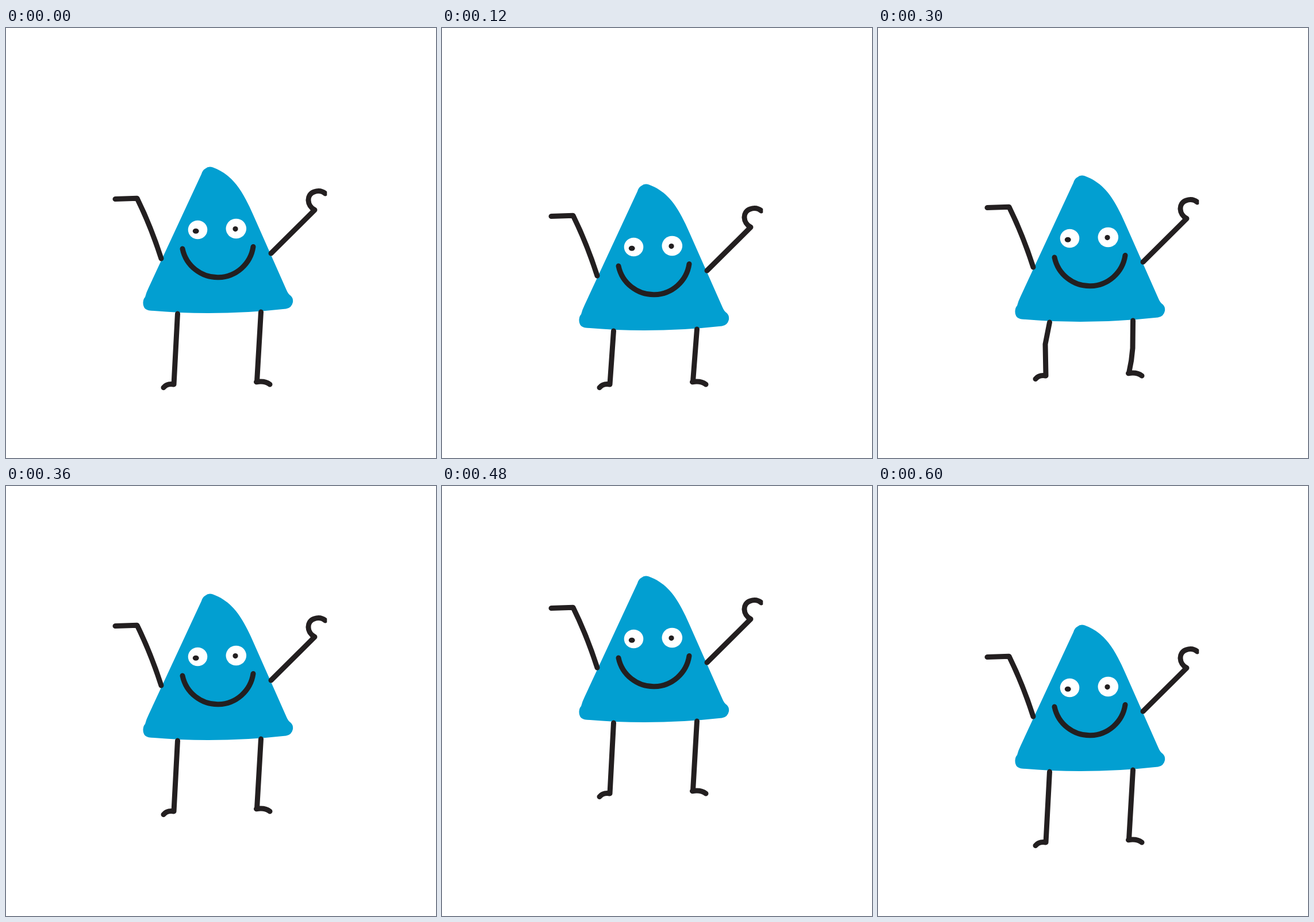
Recreate the animation shown at these times as an HTML page. Size 748x748 px, loop 0.66 s.

```html
<!DOCTYPE html>
<html lang="en">
<head>
<meta charset="utf-8">
<title>Jumping triangle</title>
<style>
  html, body { margin: 0; width: 100%; height: 100%; overflow: hidden; background: #fff; }
  svg { display: block; width: 100vw; height: 100vh; }
  .line { fill: none; stroke: #231f20; stroke-width: 9; stroke-linecap: round; stroke-linejoin: round; }
</style>
</head>
<body>
<svg viewBox="0 0 748 748">
  <clipPath id="edge"><path d="M0 0H558.3V748H0Z"/></clipPath>
  <g id="body">
    <path fill="#029fd1" d="M340 254Q342 247 347 244.5Q352 240 360 242.5C386 252 403 271 417 298Q424 311 430 325L488 456Q491 463 495 465.5Q500 470 499 477Q497 487 487 488.5Q365 502 250 491.5Q238 490 238.5 477Q239 471 242 468Q244 460 248 452Z"/>
    <g fill="#fff">
      <ellipse cx="333.5" cy="351" rx="16.8" ry="16.2"/>
      <ellipse cx="400.3" cy="349" rx="17.8" ry="17.2"/>
    </g>
    <g fill="#231f20">
      <ellipse cx="330.2" cy="353.3" rx="5.4" ry="4.5"/>
      <circle cx="399" cy="349.6" r="4.6"/>
    </g>
    <g class="line">
      <path d="M307 384A62.5 62.5 0 0 0 430 380.5"/>
      <path d="M190 297.5L228 296.3Q252 345 270 401"/>
      <path clip-path="url(#edge)" d="M461 392L537 316.5C523 309 522 290 536 285Q547 281 555.5 288"/>
    </g>
  </g>
  <path id="legs" class="line"/>
</svg>
<script>
  const STEP = 60;
  // Each pose: body offset, foot offset, then left and right knee heights when bent
  const crouch = [60, 0, 595, 583];
  const poses = [
    [0, 0], [15, 0], [30, 0], crouch, crouch,
    [15, -15, 550, 557], [-54, -54], [-123, -123], [-85, -85], [-47, -46.5], [0, 0]
  ];
  const body = document.getElementById('body');
  const legs = document.getElementById('legs');

  function draw(now) {
    const [lift, foot, kneeL, kneeR] = poses[Math.floor(now / STEP) % poses.length];
    const ankleL = 620 + foot, ankleR = 615 + foot;
    const bendL = kneeL ? `L291 ${kneeL}` : '';
    const bendR = kneeR ? `L443 ${kneeR}Q441.5 ${(kneeR + ankleR) / 2} 436.5 ${ankleR}` : '';
    body.setAttribute('transform', `translate(0 ${lift})`);
    legs.setAttribute('d',
      `M298.5 ${497 + lift}${bendL}L292 ${ankleL}q-12 -2 -18 5.5` +
      `M443.5 ${494 + lift}${bendR}L436.5 ${ankleR}l-1 .7q15 -2.5 23.5 4.3`);
  }

  const start = performance.now();
  function tick() {
    draw(performance.now() - start);
    requestAnimationFrame(tick);
  }
  tick();
</script>
</body>
</html>
```
